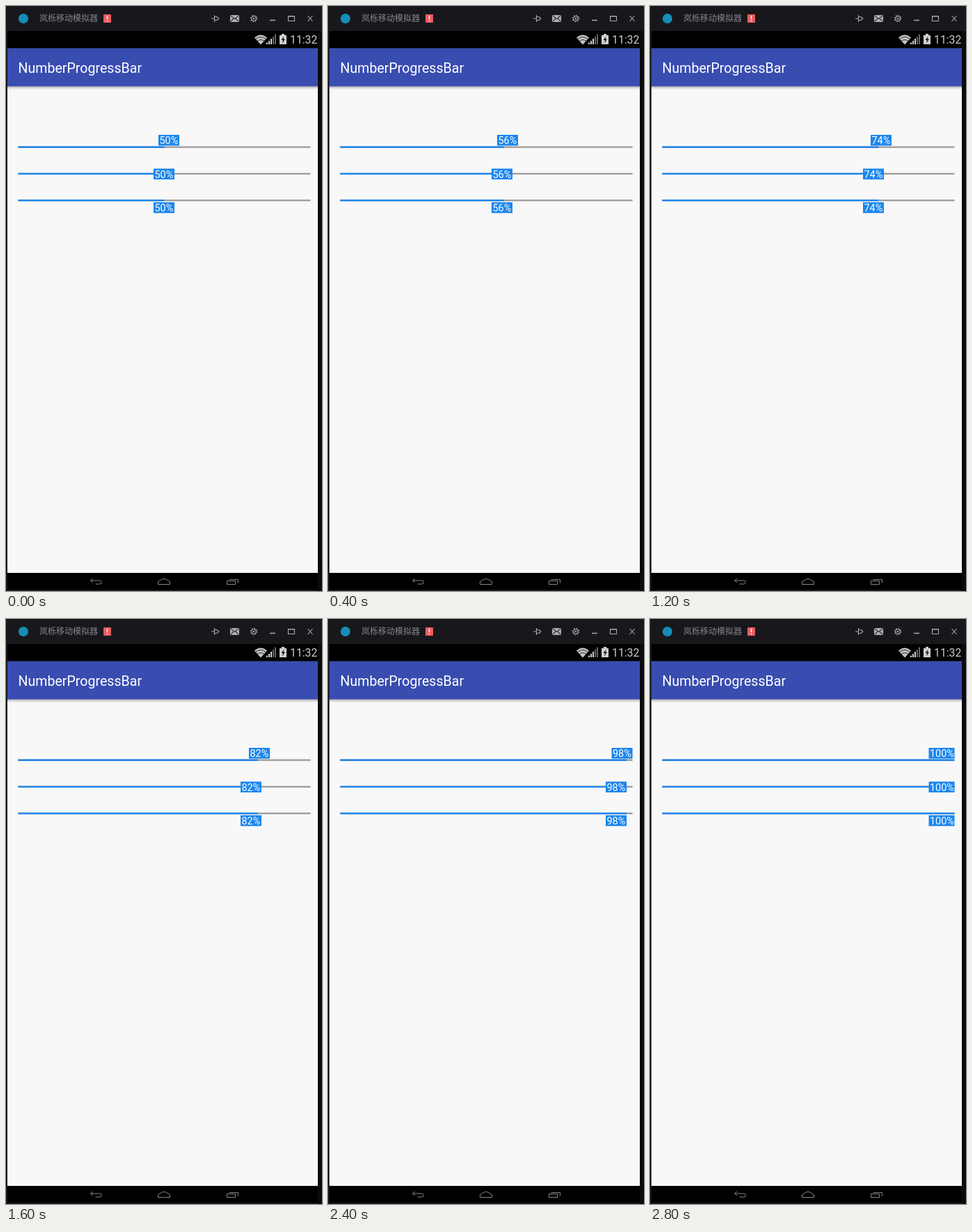
An HTML page for the animation above (3.2 s loop, 454x840 px).

```html
<!DOCTYPE html>
<html lang="en">
<head>
<meta charset="utf-8">
<title>NumberProgressBar</title>
<style>
  html, body { margin: 0; width: 100%; height: 100%; overflow: hidden; background: #000; }
  svg { display: block; width: 454px; height: 840px; }
  text { font-family: Roboto, sans-serif; fill: #fff; }
  .caption { font: 12px "Noto Sans CJK SC", "Noto Sans CJK", sans-serif; fill: #85858d; }
  .percent { font-size: 14.4px; }
  .icons { fill: none; stroke: #a9a9ae; stroke-width: 1.1; }
  .nav { fill: none; stroke: #858585; stroke-width: 1; }
</style>
</head>
<body>
<svg id="stage" viewBox="0 0 454 840">
  <defs>
    <linearGradient id="shadow" x2="0" y2="1">
      <stop stop-color="#8e8a98"/>
      <stop offset=".3" stop-color="#d6d3d6"/>
      <stop offset="1" stop-color="#f8f8f8"/>
    </linearGradient>
  </defs>

  <!-- Window frame -->
  <rect width="448" height="840" fill="#18181c"/>
  <rect x="448" width="6" height="36" fill="#18181c"/>
  <rect x="448" y="36" width="6" height="804" fill="#0b0b0d"/>
  <circle cx="25" cy="18" r="7" fill="#168db8"/>
  <text class="caption" x="48" y="22">岚栎移动模拟器</text>
  <rect x="140" y="12" width="11" height="12" rx="1" fill="#e85d60"/>
  <path d="M145.5 14v5M145.5 20.5v1.5" stroke="#fff" stroke-width="1.4"/>
  <g class="icons">
    <path d="M295 18h4M299.5 13v10M300 15.5h3l3 2.5-3 2.5h-3"/>
    <rect x="322.5" y="13.5" width="12" height="9" rx="1" fill="#b0b0b4"/>
    <path d="M323 14l5.500 4.500 5.500-4.500M323 22l4-4M334 22l-4-4" stroke="#303036"/>
    <circle cx="356" cy="18" r="3.2"/>
    <circle cx="356" cy="18" r=".7"/>
    <circle cx="356" cy="18" r="4.500" stroke-dasharray="1.500 2.034" stroke-width="1.600"/>
    <path d="M379 20.500h8" stroke-width="1.500"/>
    <path d="M405.500 14.500h9v7h-9zM405 15h10"/>
    <path d="M433.500 14l7 8M440.500 14l-7 8"/>
  </g>

  <!-- Status bar -->
  <rect x="2" y="36" width="446" height="25" fill="#000"/>
  <path d="M357 45.500Q366 37.500 375 45.500L366 55.500Z" fill="#c4c4c4"/>
  <path d="M358.500 47.500Q366 41.500 373.500 47.500M361 50.500Q366 46.500 371 50.500" fill="none" stroke="#222"/>
  <path d="M375 55V52.500M378 55V50M381 55V47" stroke="#d0d0d0" stroke-width="2"/>
  <path d="M384 55V44M387 55V40.500" stroke="#666" stroke-width="2"/>
  <path d="M393 42h3v-2h4v2h3v13h-10z" fill="#d0d0d0"/>
  <path d="M399.500 43.500l-4 5.500h2.500l-1 4.500 4-6h-2.500z" fill="#111"/>
  <text x="408" y="54" font-size="15.800" style="fill:#ccc">11:32</text>

  <!-- App -->
  <rect x="2" y="60.500" width="446" height="55.500" fill="#394db0"/>
  <text x="17.500" y="95.500" font-size="19.600">NumberProgressBar</text>
  <rect x="2" y="115.500" width="446" height="698.500" fill="#f8f8f8"/>
  <rect x="2" y="115.500" width="446" height="5" fill="url(#shadow)"/>
  <g id="bars"></g>

  <!-- Navigation bar -->
  <rect x="2" y="814" width="446" height="24" fill="#000"/>
  <g class="nav">
    <path d="M125 822l-3.500 3 3.500 3M121.500 825h13q3 0 3 2.500t-3 2.500h-6"/>
    <path d="M218.500 830.500v-4l6-3.500q2.500-1 5 0l6 3.500v4z"/>
    <path d="M317.500 825.500h12v5h-12zM320.500 823.500h13v5"/>
  </g>
</svg>
<script>
const NS = "http://www.w3.org/2000/svg";
const BLUE = "#1c86ee", GRAY = "#9e9e9e";
const LEFT = 17.5, RIGHT = 437.5, STEP = 400;
const steps = [50, 56, 65, 74, 82, 90, 98, 100];

function add(tag, attrs) {
  const node = document.createElementNS(NS, tag);
  for (const key in attrs) node.setAttribute(key, attrs[key]);
  return document.getElementById("bars").appendChild(node);
}

function makeBar(lineY, labelY, labelStart, labelRate) {
  const line = { x: LEFT, y: lineY, height: 2.4 };
  add("rect", { ...line, width: RIGHT - LEFT, fill: GRAY });
  const fill = add("rect", { ...line, fill: BLUE });
  const box = add("rect", { y: labelY, height: 15.5, fill: BLUE });
  const label = add("text", { y: labelY + 13.3, class: "percent" });

  return value => {
    const width = value === 100 ? 37 : 30;
    const x = Math.min(RIGHT - width, Math.round(labelStart + labelRate * value));
    fill.setAttribute("width", (RIGHT - LEFT) * value / 100);
    box.setAttribute("x", x);
    box.setAttribute("width", width);
    label.setAttribute("x", x + 1.5);
    label.textContent = value + "%";
  };
}

const bars = [
  makeBar(201.4, 185, 15.25, 4.075),
  makeBar(239.7, 233.5, 17, 3.9),
  makeBar(277.9, 281.8, 17, 3.9)
];

const start = performance.now();
let shown = -1;
function draw() {
  const index = Math.floor((performance.now() - start) / STEP) % steps.length;
  if (index !== shown) {
    shown = index;
    bars.forEach(update => update(steps[index]));
  }
  requestAnimationFrame(draw);
}
draw();
</script>
</body>
</html>
```
